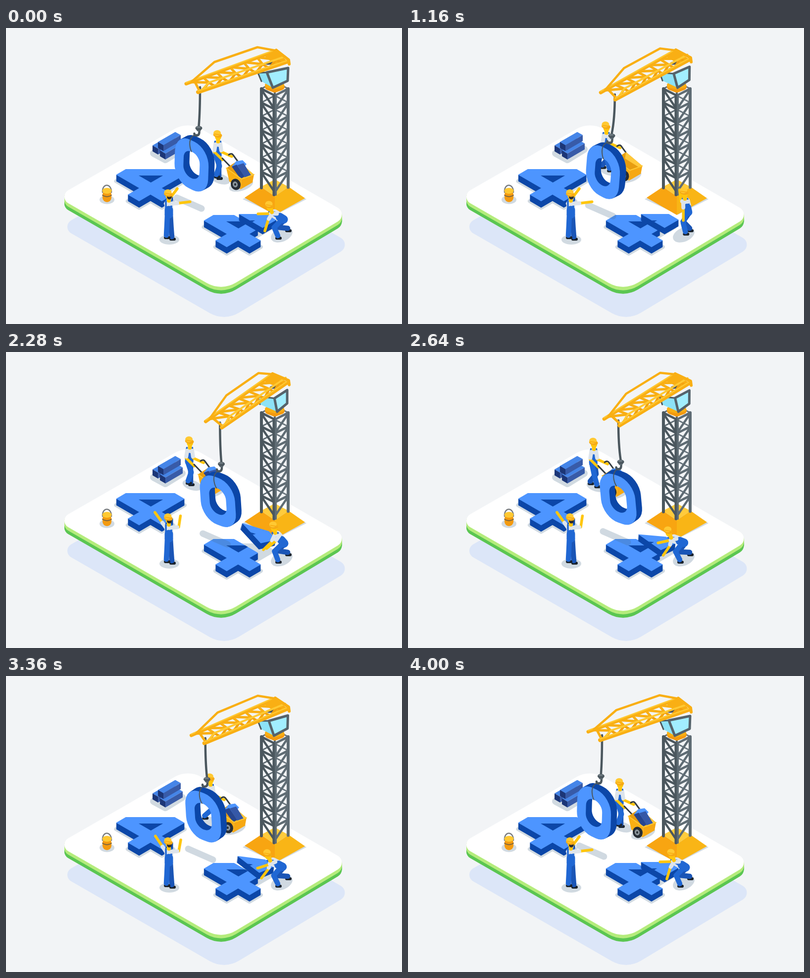
An HTML page with a canvas for the animation above (4040 ms loop, 800 px wide and 600 px high).

```html
<!DOCTYPE html>
<html lang="en">
<head>
<meta charset="utf-8">
<title>404 under construction</title>
<style>
html, body { margin: 0; width: 100%; height: 100%; overflow: hidden; background: #f2f4f6; }
canvas { display: block; }
</style>
</head>
<body>
<canvas width="800" height="600"></canvas>
<script>
const c = document.querySelector('canvas').getContext('2d');
const LOOP = 4040, TAU = Math.PI * 2;
const GROUND = '#d1dae1', SHADE = 'rgba(70,105,135,.25)', BLUE = '#4d95ff', NAVY = '#0c47a8', DENIM = '#2067d3';
const STEEL = '#4b575e', STEEL2 = '#5f6c74', GOLD = '#f9af14', SUN = '#ffc933', SKIN = '#ffc60e', DARK = '#262d35';
c.lineCap = c.lineJoin = 'round';

const mix = (a, b, k) => a + (b - a) * k;
const mixAll = (a, b, k) => a.map((v, i) => mix(v, b[i], k));
const polar = ([x, y], angle, r) => [x + r * Math.sin(angle), y - r * Math.cos(angle)];
// Isometric grid: a runs right and down, b runs left and down
const iso = (a, b, h = 0) => [23 * (a - b), 13.4 * (a + b) - h];

const ease = (t, from, to) => {
  const u = Math.min(1, Math.max(0, (t - from) / (to - from)));
  return u * u * (3 - 2 * u);
};
const pulse = (t, up, on, off, down) => ease(t, up, on) - ease(t, off, down);

function trace(pts) {
  c.beginPath();
  for (const p of pts) c.lineTo(...p);
}
function poly(color, ...pts) {
  trace(pts);
  c.closePath();
  c.fillStyle = color;
  c.fill();
}
function line(color, width, ...pts) {
  trace(pts);
  c.strokeStyle = color;
  c.lineWidth = width;
  c.stroke();
}
function curve(color, width, d) {
  c.strokeStyle = color;
  c.lineWidth = width;
  c.stroke(new Path2D(d));
}
function oval(color, x, y, rx, ry = rx, turn = 0) {
  c.beginPath();
  c.ellipse(x, y, rx, ry, turn, 0, TAU);
  c.fillStyle = color;
  c.fill();
}
function moved(x, y, draw) {
  c.save();
  c.translate(x, y);
  draw();
  c.restore();
}

function platform() {
  const slab = new Path2D('M235 266');
  for (const [x, y, nx, ny, r] of [[367.5, 189, 694, 378, 54], [694, 378, 435, 534, 16],
    [435, 534, 103, 342, 58], [103, 342, 367.5, 189, 15]]) slab.arcTo(x, y, nx, ny, r);
  slab.closePath();
  const lay = (color, x, y) => moved(x, y, () => { c.fillStyle = color; c.fill(slab); });
  lay('#dce6f8', 6, 61);
  for (let d = 14; d >= 0; d--) lay(d > 7 ? '#5bc652' : d ? '#b5ec7c' : '#fff', 0, d);
}

function bricks() {
  const brick = (x, y) => moved(x, y, () => {
    const [a, b, h] = [.48, -1.52, -12];
    poly('#4585e8', iso(0, 0), iso(0, b), iso(a, b), iso(a, 0));
    poly('#1c3677', iso(0, 0), iso(a, 0), iso(a, 0, h), iso(0, 0, h));
    poly('#385ba8', iso(a, 0), iso(a, b), iso(a, b, h), iso(a, 0, h));
  });
  line(GROUND, 14, [298, 254], [322, 267], [356, 246]);
  brick(296, 238);
  brick(311, 248);
  brick(307, 231);
}

// Outline from a start and steps along the isometric grid
function walk(a, b, steps) {
  return [[0, 0], ...steps].map(([da, db]) => iso(a += da, b += db));
}
const stem = [[1, 0], [0, 1], [-1, 0], [0, 1], [-1, 0], [0, -1], [-2.02, 0]];
const four = walk(0, 0, [[2.15, -2.15], [.87, 0], [0, 2], ...stem]);
const brokenFour = walk(0, 0, [[.91, -.91], [2.11, 0], [0, .76], ...stem]);
const loosePart = walk(.91, -.91, [[1.24, -1.24], [.87, 0], [0, 1.24]]);
const eye = walk(1.05, -.08, [[1.07, -1.07], [0, 1.07]]);

function digit(shape) {
  for (let h = 13; h > 0; h--) moved(0, h, () => poly(NAVY, ...shape));
  poly(BLUE, ...shape);
  c.save();
  c.clip();
  poly(NAVY, ...eye);
  c.restore();
}
function groundShade(shape) {
  moved(0, 13, () => {
    poly(GROUND, ...shape);
    line(GROUND, 8, ...shape, shape[0]);
  });
}
function digits() {
  for (const [x, y, shape] of [[242, 286, four], [419, 379, brokenFour]]) {
    moved(x, y, () => {
      groundShade(four);
      digit(shape);
    });
  }
}

function bucket() {
  oval(GROUND, 204, 348, 15, 9);
  curve('#7b7f83', 2.5, 'M195 333C194 314 213 314 213 333');
  line('#f39a10', 18, [204, 338], [204, 344]);
  oval(SUN, 204, 330, 9.5, 6);
  curve('#7b6540', 2, 'M195 339Q204 345 213 339');
}

function tower() {
  const left = 516, mid = 543, right = 570, floors = 7, step = 28;
  poly(GROUND, [478, 347], [mid, 312], [607, 347], [546, 378]);
  poly('#f8a511', [482, 344], [515, 322], [mid, 341], [mid, 379]);
  poly('#f9b516', [mid, 341], [571, 322], [604, 345], [mid, 379]);
  poly('#ffcb3c', [515, 322], [mid, 307], [571, 322], [mid, 341]);
  const lattice = (dip, colorL, colorR, width) => {
    for (let k = 0; k < floors; k++) {
      const y = 123 + k * step;
      for (const [x, color] of [[left, colorL], [right, colorR]]) {
        line(color, width, [x, y], [mid, y + dip]);
        line(color, width, [x, y + 2], [mid, y + dip + step]);
      }
    }
  };
  line('#59666e', 4, [mid, 110], [mid, 307]);
  lattice(-14, '#5d6971', '#69757d', 3);
  lattice(14, STEEL, STEEL2, 4.5);
  line(STEEL, 6, [left, 123], [left, 324]);
  line(STEEL2, 6, [right, 123], [right, 323]);
  line(STEEL, 6, [mid - 1.5, 138], [mid - 1.5, 338]);
  line(STEEL2, 4, [mid + 2, 138], [mid + 2, 338]);
}

function crane(p) {
  const at = (x0, y0, x1, y1) => [mix(x0, x1, p), mix(y0, y1, p)];
  // Cab
  line('#f39a10', 14, [530, 119], [543, 124], [556, 119]);
  line(GOLD, 10, [528, 116], [543, 119], [557, 116]);
  const corner = at(527, 90, 543, 94), foot = at(539, 121, 548, 121);
  const sideTop = at(509, 91, 508, 90), sideFoot = at(516, 108, 513, 106);
  const window = [corner, at(570, 81, 568, 77), at(569, 107, 568, 104), foot];
  poly('#8ce2f7', sideTop, corner, foot, sideFoot);
  line(STEEL, 3, corner, sideTop, sideFoot);
  poly('#a2eeff', ...window);
  line('#56636b', 5, ...window, corner);

  // Jib: two rails and a raised chord, joined by zigzags
  const farTip = at(364, 113, 405, 142), farEnd = at(546, 46, 538, 45);
  const nearTip = at(388, 130, 438, 154), nearEnd = at(569, 68, 569, 61);
  const far = k => mixAll(farTip, farEnd, k);
  const near = (k, lift = 0) => polar(mixAll(nearTip, nearEnd, k), 0, lift);
  const top = k => near(k, 12);
  poly(GOLD, far(.86), farEnd, nearEnd, near(.87));
  oval('#4e5358', ...at(532, 71, 542, 71), 9, 3.5, -.1);
  const bays = 6;
  for (let i = 0; i < bays; i++) {
    const [a, b, d] = [.05, .12, .19].map(k => k + i * .15);
    line(GOLD, 5, far(a), top(b), far(d));
    line('#f3a30f', 5, near(a), top(b), near(d));
  }
  const rail = (a, b, width) => {
    line(GOLD, width, a, b);
    line(SUN, 2.5, polar(a, 0, 2.5), polar(b, 0, 2.5));
  };
  rail(farTip, farEnd, 7);
  line(SUN, 4, near(.03), top(.12), top(.97));
  line(GOLD, 5, far(.09), near(.02));
  rail(nearTip, nearEnd, 8);
  line(GOLD, 6, polar(farEnd, 0, 1), polar(nearEnd, .5, 4), polar(nearEnd, 2.6, 6));
  line(GOLD, 4.5, far(.06), at(421, 69, 446, 89), at(508, 39, 510, 43), farEnd);
}

function zero(hook, turn) {
  const layers = 14;
  const ring = (w, h, rx, ry) => c.roundRect(-w / 2, -h / 2, w, h, { x: rx, y: ry });
  c.save();
  c.translate(...hook);
  c.rotate(turn);
  for (let i = layers; i >= 0; i--) {
    const k = i / layers;
    c.save();
    c.transform(1, .45, 0, 1, 12 * k - 12, 75 - 7 * k);
    c.beginPath();
    ring(69, 98, 30, 36);
    ring(33, 53, 16, 18);
    c.fillStyle = i ? NAVY : BLUE;
    c.fill('evenodd');
    c.restore();
  }
  curve(STEEL, 2, 'M-3 13C-14 14 -18 24 -17 34Q-16 43 -13 48');
  c.restore();
}
function hookBlock(x, y) {
  moved(x, y, () => {
    curve(STEEL, 4.5, 'M1 4L1 8Q1 15 -5 15Q-9 15 -9 11');
    oval(STEEL2, 0, 2, 5);
    oval(STEEL, 0, 0, 7, 4.5);
    oval('#6d7980', -1, -2, 5, 2);
  });
}

function knee([px, py], [fx, fy], side) {
  const dx = fx - px, dy = fy - py, d = Math.hypot(dx, dy), bone = 23;
  const out = side * Math.sqrt(Math.max(0, bone * bone - d * d / 4)) / d;
  return [px + dx / 2 - dy * out, py + dy / 2 + dx * out];
}
// Pose: hip x and y, lean, then upper and lower angle of each arm
function worker([x, y, lean, ...angles], feet, side, rear = false) {
  const hip = [x, y], neck = polar(hip, lean, 22), waist = polar(hip, lean, 12);
  const head = polar(neck, lean * .6, 16);
  const aside = (p, d) => [p[0] + d, p[1]];
  feet.forEach((foot, i) => {
    const start = aside(hip, i ? -3 : 3);
    line('#1b232c', 6, aside(foot, -2), aside(foot, 5));
    line(i ? DENIM : '#1a55b6', 10.5, start, knee(start, foot, side), polar(foot, 0, 5));
  });
  const arm = (d, upper, lower) => {
    const shoulder = aside(neck, d), elbow = polar(shoulder, upper, 15);
    line(SKIN, 5.5, elbow, polar(elbow, lower, 23));
    line('#dde4eb', 8, shoulder, polar(shoulder, upper, 12));
  };
  if (rear) arm(-6, angles[2], angles[3]);
  line('#dfe5ec', 18, neck, waist);
  line(DENIM, 17, polar(hip, lean, 9), hip);
  for (const d of [-6, 5]) line(DENIM, 3.5, aside(polar(neck, lean, 6), d), aside(waist, d));
  if (!rear) arm(-5, angles[2], angles[3]);
  arm(5, angles[0], angles[1]);
  line(SKIN, 8, head, polar(neck, lean, 6));
  oval(SKIN, ...head, 6.5, 7.5);
  if (rear) oval('#2b2b30', head[0] + 1, head[1] + 2, 5, 5.5);
  moved(...head, () => {
    oval('#f5a916', -1, -3, 9, 5, .15);
    oval(SUN, -2, -7, 7.5, 6);
    line(GOLD, 2, [-7, -5], [6, -3]);
  });
}

function guide(t) {
  const cheer = pulse(t, 1700, 2220, 3300, 3960);
  const swing = mix(.65, -.62, cheer);
  oval(GROUND, 330, 429, 20, 10);
  worker([329, 378, 0, 1.5, mix(1.45, .15, cheer), swing, swing], [[335, 428], [324, 425]], 1, true);
}

const crouching = [561, 388, -1.02, -1.55, -1.6, -2.6, -2.85];
const standing = [567, 370, -.05, -1.5, .25, -3.3, -3.2];
const lifting = [562, 388, -.7, -2.55, -2.25, -2.7, -2.35];
const bending = [556, 386, -1.4, -1.5, -1.6, -3, -2.6];

function fixer(t) {
  const stand = pulse(t, 120, 450, 1050, 1450);
  const lift = pulse(t, 1750, 2100, 2350, 2800) + pulse(t, 3200, 3550, 3720, 3980);
  const bend = pulse(t, 2350, 2800, 3200, 3550);
  const pose = crouching.map((v, i) =>
    v + stand * (standing[i] - v) + lift * (lifting[i] - v) + bend * (bending[i] - v));
  oval(SHADE, 557, 419, 23, 14, -.4);
  moved(508 + 9 * (1 - bend) + 2 * lift, 388 - 2 * (1 - bend) - 17 * lift, () => {
    c.rotate(.3 * lift);
    c.translate(-89, -9);
    digit(loosePart);
  });
  worker(pose, [[569, 411], [mix(549, 563, stand), mix(426, 416, stand)]], 1);
}

function cart(load) {
  const [back, left, front, right] = [[468, 269], [445, 284], [476, 306], [501, 297]];
  curve('#343d44', 3, 'M437 264L456 284M450 257Q456 252 460 259L468 270');
  poly('#e79d10', left, back, right, front);
  poly('#ffc83a', back, right, [496, 301], [466, 282]);
  c.globalAlpha = load;
  poly(BLUE, [456, 281], [465, 270], [478, 268], [486, 276], [474, 290]);
  poly('#26458f', [456, 281], [466, 277], [482, 301], [474, 306]);
  poly('#3558a7', [467, 278], [480, 274], [496, 300], [485, 307]);
  c.globalAlpha = 1;
  poly(GOLD, left, front, [474, 327], [451, 311]);
  poly('#f6a813', front, right, [498, 313], [474, 327]);
  line(SUN, 2, left, front, right);
  oval(DARK, 464, 317, 10, 11.5, -.3);
  oval('#8b959c', 463, 317, 5, 6, -.3);
  oval(DARK, 463, 317, 2, 2.5);
}
function carter(t) {
  const away = pulse(t, 430, 1920, 2400, 3850);
  const load = 1 - pulse(t, 150, 420, 2000, 2240);
  const step = 10 * Math.sin(away * TAU * 2.5);
  moved(-57 * away, -36 * away, () => {
    oval(SHADE, 433, 306, 20, 10, .3);
    oval(SHADE, 475, 319, 25, 11, -.3);
    worker([427, 258, .05, 3, 2, 3.3, 2.35],
      [[430 - step, 305 - step / 2], [425 + step, 302 + step / 2]], -1);
    cart(load);
  });
}

function draw(t) {
  const phase = t / LOOP * TAU, p = (1 - Math.cos(phase)) / 2;
  const ropeX = 392 + 42 * p, ropeY = 120 + 24 * p;
  const hookX = ropeX - 1 - 6 * Math.sin(phase + .26), hookY = 203 + 25 * p;
  const sway = Math.sin(phase + .38);

  c.fillStyle = '#f2f4f6';
  c.fillRect(0, 0, 800, 600);
  platform();
  bricks();
  digits();
  bucket();
  moved(hookX - 17 - 6.5 * sway, hookY + 152, () => line(SHADE, 13, [-25, -11], [25, 11]));
  carter(t);
  tower();
  curve(STEEL, 4.5, `M${ropeX} ${ropeY}Q${ropeX} ${(ropeY + hookY) / 2 + 8} ${hookX} ${hookY - 4}`);
  crane(p);
  zero([hookX, hookY], sway * .094);
  hookBlock(hookX, hookY);
  guide(t);
  fixer(t);
}

function tick() {
  draw(Math.floor(performance.now() % LOOP / 40) * 40);
  requestAnimationFrame(tick);
}
tick();
</script>
</body>
</html>
```
